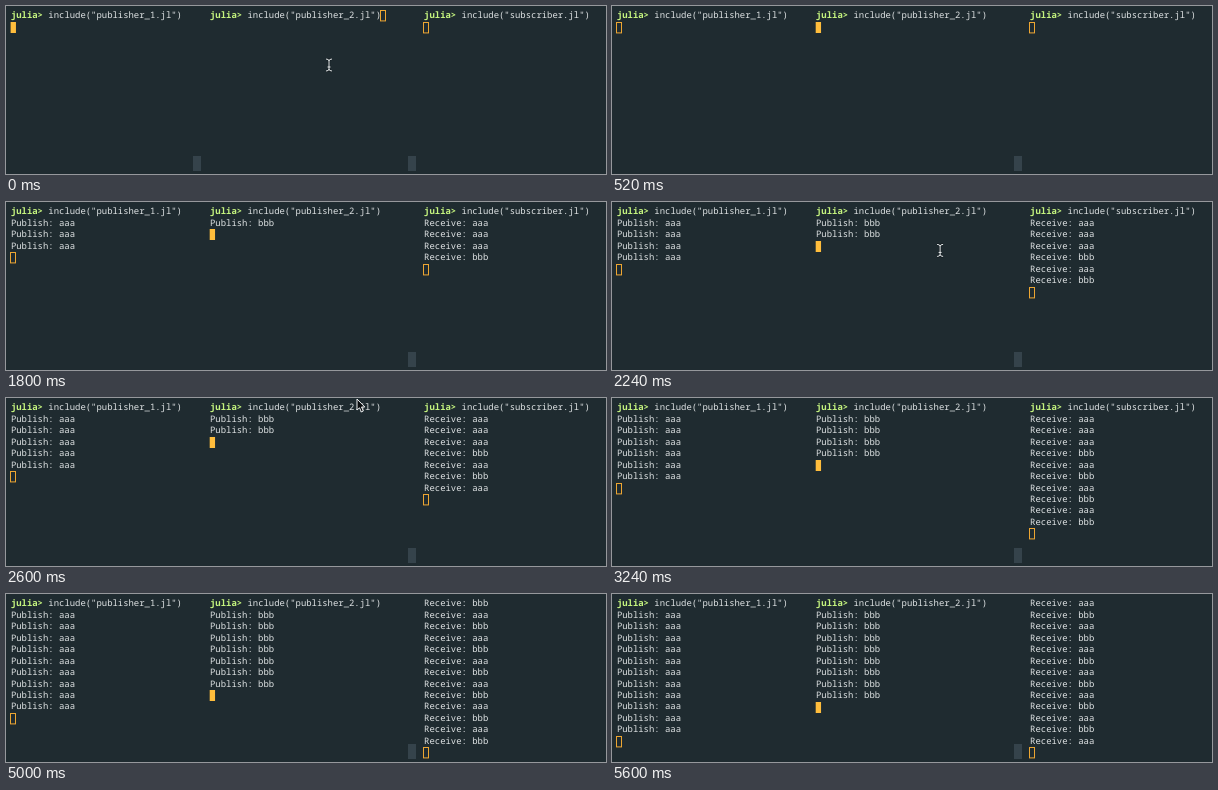
These frames come from a looping animation (600x168 px, 5800 ms). An HTML page with a canvas:

```html
<!DOCTYPE html>
<html lang="en">
<head>
<meta charset="utf-8">
<title>Publishers and subscriber</title>
<style>
  html, body { margin: 0; width: 600px; height: 168px; overflow: hidden; background: #1f2b30; }
  canvas { display: block; }
</style>
</head>
<body>
<canvas id="stage" width="600" height="168"></canvas>
<script>
const ctx = document.getElementById("stage").getContext("2d");
const LOOP = 5800, TICK = 40;
const FONT_SIZE = 8.92, CELL = FONT_SIZE * 0.6, ROW = 11.46, TOP = 3.9, ROWS = 14;
const FACE = `${FONT_SIZE}px "Noto Sans Mono", "DejaVu Sans Mono", monospace`;
const COLOR = {
  back: "#1f2b30", text: "#e0e4e5", prompt: "#c6f57f",
  cursor: "#ffbd3c", outline: "#eda632", scroll: "#35434b"
};
const FOCUS = 40, ENTER = 520;
const MOUSE = { show: 2120, edge: 2560, leave: 2640, gone: 2720 };

// Both publishers send about twice a second, at their own pace.
const alphaTimes = Array.from({ length: 11 }, (_, i) => Math.ceil((568 + 502 * i) / TICK) * TICK);
const betaTimes = [1760, 2240, 2760, 3240, 3760, 4280, 4760, 5320];
const messages = [
  ...alphaTimes.map(at => ({ at, word: "aaa" })),
  ...betaTimes.map(at => ({ at, word: "bbb" }))
].sort((a, b) => a.at - b.at);

function drawText(text, x, row, color, weight = 500) {
  ctx.font = `${weight} ${FACE}`;
  ctx.fillStyle = color;
  ctx.fillText(text, x + 0.3, TOP + row * ROW + 8.4);
}

function drawCursor(x, row, filled) {
  const left = Math.floor(x), top = Math.ceil(TOP + row * ROW);
  if (filled) {
    ctx.fillStyle = COLOR.cursor;
    ctx.fillRect(x, top, CELL, 11);
  } else {
    ctx.strokeStyle = COLOR.outline;
    ctx.lineWidth = 1;
    ctx.strokeRect(left + 0.5, top + 0.5, 5, 10.4);
  }
}

function drawPane(x, file, output, focused, entered = true) {
  const command = `include("${file}")`;
  const skipped = Math.max(0, output.length + 2 - ROWS);
  if (!skipped) {
    drawText("julia>", x, 0, COLOR.prompt, 700);
    drawText(command, x + 7 * CELL, 0, COLOR.text);
  }
  output.forEach((line, i) => {
    const row = i + 1 - skipped;
    if (row >= 0) drawText(line, x, row, COLOR.text);
  });
  if (entered) drawCursor(x, output.length + 1 - skipped, focused);
  else drawCursor(x + (7 + command.length) * CELL, 0, focused);
}

function drawBeam(x, y) {
  const path = new Path2D();
  path.moveTo(x - 3, y - 6);
  path.quadraticCurveTo(x, y - 6, x, y - 4);
  path.quadraticCurveTo(x, y - 6, x + 3, y - 6);
  path.moveTo(x, y - 4);
  path.lineTo(x, y + 4);
  path.moveTo(x - 3, y + 6);
  path.quadraticCurveTo(x, y + 6, x, y + 4);
  path.quadraticCurveTo(x, y + 6, x + 3, y + 6);
  path.moveTo(x - 1.5, y + 2);
  path.lineTo(x + 1.5, y + 2);
  for (const [color, width] of [["#10181c", 2.2], ["#e9eeef", 1]]) {
    ctx.strokeStyle = color;
    ctx.lineWidth = width;
    ctx.stroke(path);
  }
}

function drawArrow(x, y) {
  const shape = [[0, 0], [0, 11], [2.5, 8.8], [4.3, 12.8], [6.3, 11.9], [4.5, 8], [7.8, 8]];
  ctx.beginPath();
  shape.forEach(([dx, dy]) => ctx.lineTo(x + dx, y + dy));
  ctx.closePath();
  ctx.fillStyle = "#080b0d";
  ctx.strokeStyle = "#edf0f1";
  ctx.lineWidth = 1;
  ctx.fill();
  ctx.stroke();
}

function drawMouse(time) {
  if (time < ENTER) return drawBeam(323, 59);
  if (time < MOUSE.show || time >= MOUSE.gone) return;
  const p = Math.min(1, (time - MOUSE.show) / (MOUSE.edge - MOUSE.show));
  const ease = p * p * (3 - 2 * p);
  const exit = Math.max(0, (time - MOUSE.leave + TICK) / (MOUSE.gone - MOUSE.leave + TICK));
  const x = 323 + 28 * ease, y = 59 - 58 * ease - 16 * exit;
  if (y < 8) drawArrow(x, y);
  else drawBeam(x, y);
}

function draw(time) {
  ctx.fillStyle = COLOR.back;
  ctx.fillRect(0, 0, 600, 168);
  ctx.fillStyle = COLOR.scroll;
  if (time < ENTER) ctx.fillRect(187, 150, 8, 15);
  ctx.fillRect(402, 150, 8, 15);

  const sent = messages.filter(m => m.at <= time);
  const published = word => sent.filter(m => m.word === word).map(m => `Publish: ${m.word}`);
  drawPane(4.6, "publisher_1.jl", published("aaa"), time < FOCUS);
  drawPane(203.7, "publisher_2.jl", published("bbb"), time >= FOCUS, time >= ENTER);
  drawPane(417.8, "subscriber.jl", sent.map(m => `Receive: ${m.word}`), false);
  drawMouse(time);
}

ctx.textRendering = "geometricPrecision";
ctx.fontKerning = "none";
const start = performance.now();
function tick() {
  const time = (performance.now() - start) % LOOP;
  draw(Math.floor(time / TICK) * TICK);
  requestAnimationFrame(tick);
}
tick();
</script>
</body>
</html>
```
